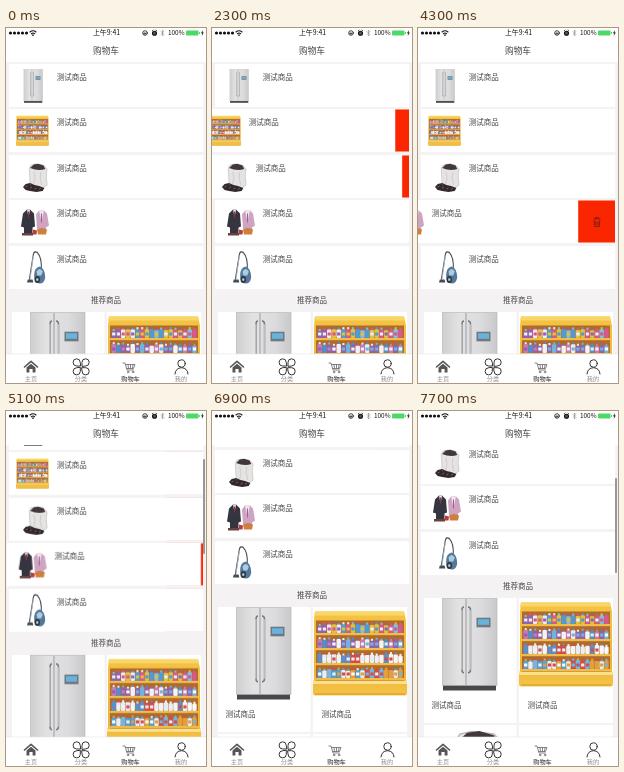
An HTML page for the animation above (7.8 s loop, 200x355 px).

```html
<!DOCTYPE html>
<html lang="zh-CN">
<head>
<meta charset="utf-8">
<title>购物车</title>
<style>
html, body { margin: 0; width: 100%; height: 100%; overflow: hidden; background: #fff; }
svg { display: block; }
#stage { width: 200px; height: 355px; }
text { font-family: "Noto Sans CJK SC", "Noto Sans CJK", "Noto Sans", sans-serif; font-size: 7.5px; fill: #444; }
.mid { text-anchor: middle; }
.line { fill: none; stroke: #333; stroke-width: 1; stroke-linejoin: round; stroke-linecap: round; }
.tab text { font-size: 6.2px; fill: #8c8c8c; text-anchor: middle; }
.tab .on { fill: #222; }

#page, #thumb, #bar, .cell { animation: 7.8s linear infinite both; }
#page { animation-name: scroll; }
#thumb { animation-name: thumb; }
#bar { animation-name: bar; }
#cell0 { animation-name: swipe0; }
#cell1 { animation-name: swipe1; }
#cell2 { animation-name: swipe2; }
#cell3 { animation-name: swipe3; }
#cell4 { animation-name: swipe4; }

@keyframes swipe0 {
  0%, 1.28% { transform: none; animation-timing-function: ease-in-out; }
  11.54%, 16.67% { transform: translateX(-37px); animation-timing-function: ease-out; }
  21.79%, 100% { transform: none; }
}
@keyframes swipe1 {
  0%, 16.67% { transform: none; animation-timing-function: ease-in-out; }
  25.64%, 26.92% { transform: translateX(-37px); }
  29.49% { transform: translateX(-14px); animation-timing-function: ease-out; }
  33.33%, 100% { transform: none; }
}
@keyframes swipe2 {
  0%, 26.92% { transform: none; }
  29.49% { transform: translateX(-7px); animation-timing-function: ease-out; }
  35.9%, 37.18% { transform: translateX(-37px); animation-timing-function: ease-out; }
  42.31%, 100% { transform: none; }
}
@keyframes swipe3 {
  0%, 37.18% { transform: none; animation-timing-function: ease-in-out; }
  50%, 58.97% { transform: translateX(-37px); }
  65.38% { transform: translateX(-2.3px); animation-timing-function: ease-out; }
  67.95%, 100% { transform: none; }
}
@keyframes swipe4 {
  0%, 70.51% { transform: none; animation-timing-function: ease-in-out; }
  76.92% { transform: translateX(-37px); }
  79.49% { transform: translateX(-18.5px); animation-timing-function: ease-out; }
  82.05%, 100% { transform: none; }
}
@keyframes scroll {
  0%, 58.97% { transform: none; }
  65.38% { transform: translateY(-40px); animation-timing-function: ease-out; }
  69.23%, 76.92% { transform: translateY(-62px); }
  79.49% { transform: translateY(-75px); animation-timing-function: ease-out; }
  85.9%, 88.46% { transform: translateY(-88px); animation-timing-function: ease-out; }
  98.72%, 100% { transform: translateY(-97px); }
}
@keyframes thumb {
  0%, 58.97% { transform: none; }
  65.38% { transform: translateY(13px); animation-timing-function: ease-out; }
  69.23%, 76.92% { transform: translateY(20.5px); }
  79.49% { transform: translateY(24.5px); animation-timing-function: ease-out; }
  85.9%, 88.46% { transform: translateY(29px); animation-timing-function: ease-out; }
  98.72%, 100% { transform: translateY(32px); }
}
@keyframes bar {
  0%, 58.97% { opacity: 0; }
  60.26%, 69.23% { opacity: 1; }
  71.79%, 76.92% { opacity: 0; }
  78.21%, 85.9% { opacity: 1; }
  88.2%, 88.5% { opacity: 0; }
  89.74%, 100% { opacity: 1; }
}
</style>
</head>
<body>
<svg id="stage" viewBox="0 0 200 355">
  <defs>
    <linearGradient id="steel">
      <stop offset="0" stop-color="#cfcfd1"/><stop offset=".3" stop-color="#e2e2e3"/>
      <stop offset=".7" stop-color="#dcdcde"/><stop offset="1" stop-color="#c9c9cc"/>
    </linearGradient>
    <linearGradient id="gold" x2="0" y2="1">
      <stop offset="0" stop-color="#f4c444"/><stop offset=".7" stop-color="#eeb236"/><stop offset="1" stop-color="#f3c548"/>
    </linearGradient>
    <clipPath id="view"><rect y="34" width="200" height="292"/></clipPath>

    <symbol id="fridge" viewBox="0 0 58 92" preserveAspectRatio="none">
      <path d="M3 86H56V91.500H3Z" fill="#47474c"/>
      <rect x="2.500" y=".5" width="54.500" height="86" fill="url(#steel)" stroke="#b2b2b5" stroke-width=".6"/>
      <path d="M26 1V86" stroke="#8d8d92" stroke-width=".8"/>
      <path d="M24 9Q22 9 22 12V71Q22 74 24 74M28 9Q30.500 9 30.500 12V71Q30.500 74 28 74" fill="none" stroke="#77777c" stroke-width="1.500"/>
      <path d="M21.800 12V71M30.300 12V71" stroke="#f2f2f3" stroke-width=".7"/>
      <rect x="36.500" y="19.500" width="14" height="9.500" fill="#70777e"/>
      <rect x="38" y="21" width="11" height="5.500" fill="#66b4dc"/>
    </symbol>

    <symbol id="shelf" viewBox="0 0 94 86" preserveAspectRatio="none">
      <path d="M2 1H91L93 10V69L94 72V83Q94 85 91 85H3Q0 85 0 83V72L1 69V10Z" fill="url(#gold)"/>
      <path d="M2 1H91L92 5H1Z" fill="#f8d667"/>
      <rect x="3" y="10" width="88" height="60" fill="#b06a2c"/>
      <g id="goods"></g>
      <path d="M0 70.500H94V73.500H0Z" fill="#fae08a"/>
      <path d="M2 83.500H92" stroke="#d99420" stroke-width="1"/>
    </symbol>

    <symbol id="beans" viewBox="0 0 28 30" preserveAspectRatio="none">
      <path d="M7 5L9 2L14 1L23 2L27 6L26 13L27 22Q23 26 17 25L8 22Z" fill="#e6e4e3" stroke="#bbb7b5" stroke-width=".6"/>
      <path d="M8 5L12 1.500L17 .8L23 2.500L25 6Q17 8.500 8 5Z" fill="#40383c"/>
      <path d="M12 9Q15 14 12 21M20 9Q18 15 21 22" fill="none" stroke="#c8c4c2" stroke-width=".8"/>
      <path d="M0 24L3 21L8 20L13 22L18 23L24 25L22 28L15 29L8 28L3 27Z" fill="#33292c"/>
      <path d="M3 24L5 23M8 25L10 24M13 26L15 25M8 22L9 21.500M18 26L20 25.500" stroke="#8a7a7b" stroke-width=".8"/>
    </symbol>

    <symbol id="wear" viewBox="0 0 28 28" preserveAspectRatio="none">
      <path d="M2 5L6 1H9L13 5L14 18L11.500 19V25H3V19L0 18Z" fill="#34353f"/>
      <path d="M6 1L7.500 9L9 1Z" fill="#eeeaec"/>
      <path d="M7.500 3V9" stroke="#a52b38" stroke-width="1"/>
      <path d="M15 6L18 2H23L26 5L28 17L25 19V21H16Z" fill="#cfa3c2"/>
      <path d="M18 2L20.500 13L23 2Z" fill="#f5e3ea"/>
      <path d="M20.500 5V14" stroke="#8d6796" stroke-width="1"/>
      <path d="M16 21Q21 18 26 21L25 26H17Z" fill="#cf7f3c"/>
      <path d="M1 24.500H12V27H1Z" fill="#6b4140"/>
      <path d="M12 21L16 22L15.500 26H12Z" fill="#b83c3d"/>
    </symbol>

    <symbol id="vacuum" viewBox="0 0 24 34" preserveAspectRatio="none">
      <path d="M3 29L8 4Q9 0 13 2Q19 7 18 19" fill="none" stroke="#4b5058" stroke-width="1.400"/>
      <path d="M8 5L4 28" stroke="#aeb7be" stroke-width="1"/>
      <path d="M1 29H7L8 32H0Z" fill="#424c54"/>
      <path d="M9 25Q9 17 16 16Q23 18 23 27Q22 33 16 33Q9 33 9 25Z" fill="#55789a"/>
      <path d="M12 21Q16 16 20 21L18 25H13Z" fill="#a9cde0"/>
      <circle cx="13" cy="29" r="3.500" fill="#2c3844"/>
      <circle cx="13" cy="29" r="1.500" fill="#b9c4cc"/>
    </symbol>
  </defs>

  <rect width="200" height="355" fill="#fff"/>
  <g clip-path="url(#view)">
    <rect y="34" width="200" height="292" fill="#f4f2f3"/>
    <g id="page">
      <g id="rows"></g>
      <text class="mid" x="100" y="274.700">推荐商品</text>
      <g fill="#fff">
        <rect x="6" y="284" width="92.500" height="125"/><rect x="101" y="284" width="94" height="125"/>
        <rect x="6" y="411" width="92.500" height="125"/><rect x="101" y="411" width="94" height="125"/>
      </g>
      <use href="#fridge" x="22" y="284" width="58" height="93"/>
      <use href="#shelf" x="101" y="287.500" width="94" height="86"/>
      <text x="13.500" y="393.700">测试商品</text>
      <text x="109.500" y="393.700">测试商品</text>
      <use href="#beans" x="20" y="415" width="68" height="76"/>
    </g>
    <g id="bar"><rect id="thumb" x="197.200" y="35" width="1.600" height="95" rx=".8" fill="#808084"/></g>
  </g>

  <!-- Status and title bars -->
  <g id="dots" fill="#111"></g>
  <g class="line" style="stroke:#111;stroke-width:1.100">
    <path d="M24 4Q27 1.500 30 4M25.400 5.700Q27 4.400 28.600 5.700"/>
    <circle cx="27" cy="7.200" r=".3"/>
    <circle cx="139" cy="5" r="2.300" stroke-width=".8"/>
    <path d="M138.300 5H139.700V6H138.300Z" stroke-width=".7"/>
    <circle cx="148.500" cy="5.200" r="2" fill="#555"/>
    <path d="M146.300 2.800L147 2.200M150.700 2.800L150 2.200" stroke-width=".8"/>
    <path d="M155 3.500L158 6.500L156.500 8V2L158 3.500L155 6.500" stroke="#888" stroke-width=".6"/>
  </g>
  <text class="mid" x="100.500" y="7.400" style="font-size:6.900px;font-weight:500;fill:#111">上午9:41</text>
  <text x="162" y="7.300" style="font-size:6.400px;fill:#111">100%</text>
  <rect x="180" y="2.500" width="12.500" height="5" rx="1" fill="#4cd964"/>
  <rect x="193" y="4" width="1" height="2" fill="#4cd964"/>
  <path d="M197 2L195 5.300H196.300L195.700 8L197.800 4.500H196.500Z" fill="#111"/>
  <text class="mid" x="100" y="25.500" style="font-size:8.700px">购物车</text>

  <!-- Tab bar -->
  <path d="M0 326H200" stroke="#e6e6e8" stroke-width=".6"/>
  <g class="tab">
    <path d="M18.500 339L25 333.300L31.500 339" class="line" style="stroke:#555;stroke-width:1.600"/>
    <path d="M20.500 339.600L25 335.700L29.500 339.600V344.500H26.600V341H23.400V344.500H20.500Z" fill="#555"/>
    <g class="line" stroke-width="1.200">
      <path d="M74.300 338H70.500A3.600 3.600 0 1 1 74.300 334.300Z"/>
      <path d="M76 338V334.300A3.600 3.600 0 1 1 79.800 338Z"/>
      <path d="M74.300 339.700V343.400A3.600 3.600 0 1 1 70.500 339.700Z"/>
      <path d="M76 339.700H79.800A3.600 3.600 0 1 1 76 343.400Z"/>
    </g>
    <g class="line" style="stroke:#777;stroke-width:.9">
      <path d="M117 335H119L121 342H127.500M119.700 336.500H129L127.500 340.500H120.800M122 336.500L122.500 340.500M124.500 336.500V340.500M127 336.500L126.500 340.500"/>
      <circle cx="122" cy="344" r=".8"/><circle cx="127" cy="344" r=".8"/>
    </g>
    <g class="line">
      <circle cx="175.500" cy="335.500" r="3.700"/>
      <path d="M169 346Q169.500 340 175.500 339.700Q181.500 340 182 346"/>
    </g>
    <text x="25" y="352.700">主页</text>
    <text x="75" y="352.700">分类</text>
    <text class="on" x="124.500" y="352.700">购物车</text>
    <text x="175" y="352.700">我的</text>
  </g>
</svg>
<script>
const fill = (id, html) => { document.getElementById(id).innerHTML = html; };
const range = (n, make) => Array.from({ length: n }, (_, i) => make(i)).join('');

let seed = 7;
const random = () => (seed = seed * 16807 % 2147483647) / 2147483647;
const pick = list => list[Math.floor(random() * list.length)];

// Goods colours, one list per shelf
const shelves = [
  ['#4f9bd8', '#8d62b8', '#e0c23c', '#d9578f', '#f0edf2', '#7fc0e0'],
  ['#8d62b8', '#4f8fd0', '#e9eef5', '#f4f4f6', '#c77bb8', '#6fb4de'],
  ['#f4f4f6', '#e8ecf4', '#d84a4a', '#f4f4f6', '#5b8fd0'],
  ['#4fa3dc', '#e9eef5', '#d84a4a', '#6db8e6', '#e3a03a']
];

fill('goods', range(4, r => {
  const floor = 22.5 + r * 15;
  return range(18, i => {
    const x = 4.5 + i * 4.75, h = 9 + random() * 2;
    return `<rect x="${x + 1.2}" y="${floor - h}" width="2" height="3" fill="${pick(shelves[r])}"/>
      <rect x="${x}" y="${floor - h + 2}" width="4.4" height="${h - 2}" rx="1" fill="${pick(shelves[r])}"/>
      <rect x="${x + .6}" y="${floor - 5.5}" width="3.2" height="3" fill="${pick(['#fff', '#eef', ...shelves[r]])}"/>`;
  }) + `<rect x="2" y="${floor}" width="90" height="2.2" fill="#f0bd4a"/>`;
}));

// Picture id, then x, y, width and height inside the cell
const items = [
  ['fridge', 17, 5, 20, 34],
  ['shelf', 10, 6.5, 33, 30.5],
  ['beans', 17, 8, 25, 30],
  ['wear', 15, 8.5, 28, 28],
  ['vacuum', 21, 4.5, 19, 34]
];
const trash = `<path d="M175.500 19H182.500M177.500 19V17.500H180.500V19M176.300 20.500L176.800 26.500H181.200L181.700 20.500M178 21.500V25M180 21.500V25"
  fill="none" stroke="#8f1d10" stroke-width="1.100"/>`;

fill('rows', range(items.length, i => {
  const [id, x, y, w, h] = items[i];
  return `<g transform="translate(0 ${Math.round(36 + i * 45.4)})">
    <rect x="160" y=".5" width="37" height="42" fill="#fa2600"/>${trash}
    <g class="cell" id="cell${i}">
      <rect x="3" width="194.200" height="43" fill="#fff"/>
      <use href="#${id}" x="${x}" y="${y}" width="${w}" height="${h}"/>
      <text x="50.800" y="15.900">测试商品</text>
    </g>
  </g>`;
}));

fill('dots', range(5, i => `<circle cx="${4.5 + i * 4}" cy="5" r="1.600"/>`));
</script>
</body>
</html>
```
